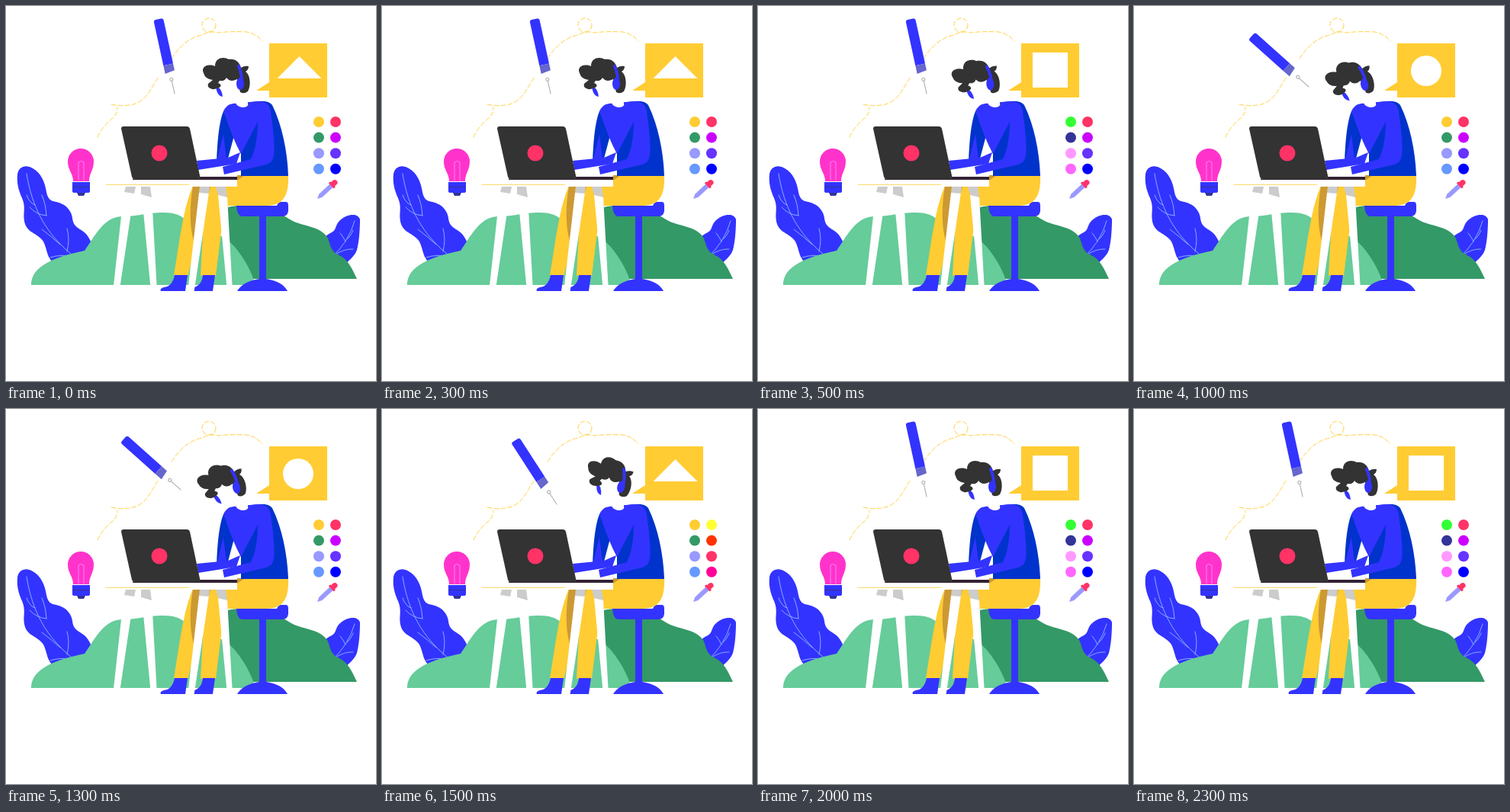
An HTML page that plays this animation: 485 px wide and 492 px high, repeating every 2500 ms.

```html
<!DOCTYPE html>
<html lang="en">
<head>
<meta charset="utf-8">
<title>Designer at work</title>
<style>
html, body { margin: 0; width: 100%; height: 100%; overflow: hidden; background: #fff }
svg { display: block }
.blue { fill: #33f }
.navy { fill: #03c }
.sun { fill: #fc3 }
.shade { fill: #c93 }
.grey { fill: #ccc }
.dark { fill: #333 }
.white { fill: #fff }
.line { fill: none; stroke-linecap: round; stroke-linejoin: round }
</style>
</head>
<body>
<svg width="485" height="492" viewBox="0 0 485 492">
  <!-- leaves -->
  <path class="blue" d="M15 221C16 211 26 207 35 213C46 219 51 231 53 244C55 254 59 256 66 257C80 260 86 270 87 278C88 291 98 292 104 298C110 304 112 313 118 321L60 335C53 327 54 319 49 309C43 299 29 298 25 286C21 272 27 266 21 252C16 241 14 232 15 221Z"/>
  <path class="blue" d="M464 280C461 271 447 273 438 281C431 287 434 293 427 297C419 301 415 305 416 312L424 334L444 341C448 333 456 331 460 320C463 309 464 292 464 280Z"/>
  <path class="line" stroke="#9cf" stroke-width=".8" d="M27 220C34 264 52 300 90 329M27 248Q31 259 38 261M53 275Q52 259 47 248M31 264Q40 274 53 275M47 293Q60 303 71 313M80 322Q84 306 80 292M58 330Q72 325 90 329M457 282Q449 310 426 331M438 298Q443 304 445 309M455 294Q452 302 447 306M432 326Q444 318 455 319"/>

  <!-- hills -->
  <path fill="#396" d="M284 358V266Q300 260 322 263C352 266 362 274 374 281C388 289 410 288 421 303C426 313 424 321 437 327C450 334 454 346 460 358Z"/>
  <path fill="#6c9" d="M33 366C33 345 54 331 103 321C118 300 128 276 154 276C174 276 183 271 207 271C231 271 237 282 246 292C259 306 274 297 285 303C300 312 320 340 327 366Z"/>

  <!-- stool -->
  <path class="blue" d="M302 262H355Q357 257 361 257H367Q370 257 370 262V269Q369 276 363 276H309Q303 275 302 262ZM332 275H341V358Q362 361 369 374H303Q311 361 332 358Z"/>

  <!-- trousers and shoes -->
  <path class="sun" d="M245 236H266L239 353H220C226 321 231 268 245 236Z"/>
  <path class="shade" d="M245 236H270L260 280L246 308Q238 280 245 236Z"/>
  <path class="sun" d="M303 222H370C371 248 364 262 341 262H293Q284 264 284 281L275 354H255L258 297C262 270 264 250 268 237H303Z"/>
  <path class="shade" d="M303 222H313L303 229Z"/>
  <path class="blue" d="M221 353H238L235 374H203Q201 371 207 369Q218 368 221 353ZM258 353H274L271 374H241Q239 372 244 370Q257 367 258 353Z"/>

  <!-- sweater -->
  <path class="navy" d="M292 130L330 125Q345 124 349 130C362 156 369 192 370 223H308V194L299 170L291 200L276 205C277 178 279 153 285 138Z"/>
  <path class="blue" d="M285 139Q288 129 298 128L330 125L331 150L308 194Q298 176 287 143Z"/>
  <path class="blue" d="M285 168L289 200L276 205Z"/>
  <path class="blue" d="M330 125Q344 124 347 138C350 160 353 186 351 196Q350 205 341 208L286 221L284 211L321 201Q330 182 330 151Z"/>
  <path class="blue" d="M250 203L291 199L307 192L302 207L252 215Z"/>
  <path class="white" d="M301 113H317V127Q319 133 309 133Q301 131 301 126Z"/>

  <!-- table and laptop -->
  <path class="white" d="M151 276L155 237H169L147 385H139ZM178 248H191L198 375H190ZM253 245H266L245 385H237ZM278 248L290 250L297 375H290ZM130 229H303V237H130Z"/>
  <path class="grey" d="M157 237H170L168 246L155 244ZM177 237H189L191 251L177 247ZM254 237H267L266 246L253 245ZM275 237H288L290 251L278 248Z"/>
  <path class="line" stroke="#fc3" stroke-width=".8" d="M131 234.3H240"/>
  <path fill="#323" d="M166 226.500L254 224H303V228H166Z"/>
  <path class="dark" d="M154 158H237Q240 158 241 161L255 227H169Q166 227 165 224L151 161Q151 158 154 158Z"/>
  <circle cx="201" cy="193" r="10.5" fill="#f36"/>

  <!-- bulb -->
  <path fill="#f3c" d="M88 230C88 219 81 216 81 204A17 17 0 0 1 115 204C115 216 109 219 109 230Z"/>
  <path class="line" stroke="#f9f" stroke-width=".8" d="M95 229V205Q98.500 202 102 205V229"/>
  <path class="blue" d="M87 231H110V243Q110 245 107 245H90Q87 245 87 243Z"/>
  <path fill="#339" d="M93 245H104L102 249H95ZM87 237H110V238H87Z"/>

  <!-- dropper -->
  <g transform="translate(408 253) rotate(-43)">
    <path fill="#99f" d="M0 0L6-3H26V3H6Z"/>
    <path fill="#f36" d="M25-5H28V-3.500H32Q35-3 35 0T32 3.500H28V5H25Z"/>
  </g>

  <!-- thread -->
  <g class="line" stroke="#fc3" stroke-width=".9" stroke-dasharray="6 3">
    <path d="M120 172Q127 157 140 147Q146 142 146 133M138 129Q151 132 161 130C184 128 189 108 200 93M217 69C228 52 241 41 257 38Q267 32 277 35Q295 33 315 34Q328 36 336 46"/>
    <circle cx="266" cy="25" r="9"/>
  </g>

  <!-- speech bubble -->
  <path class="sun" d="M345 49H421V120H345V111H328L345 100Z"/>
  <path id="icon" class="white"/>

  <g id="head">
    <path class="blue" d="M275 104Q283 108 284 119Q276 118 275 104Z"/>
    <path class="white" d="M280 93H308V112Q305 123 294 122Q281 119 280 93Z"/>
    <path class="dark" d="M259 88C255 80 264 75 274 79C274 67 286 66 292 70C301 69 306 74 308 81Q313 78 318 79Q318 84 314 86C321 91 321 106 317 112Q312 116 307 113L303 96Q294 101 289 94Q287 99 280 98L278 101Q283 103 281 106Q276 110 270 109Q263 107 265 102L271 97Q261 96 259 88Z"/>
    <path class="line" stroke="#33f" stroke-width="4" d="M305 79Q310 90 309 104"/>
    <ellipse class="blue" cx="307" cy="102" rx="5" ry="8"/>
  </g>

  <g id="pen">
    <path class="blue" d="M-39-6.500H-97Q-100-6.500-100-3.500V3.500Q-100 6.500-97 6.500H-39Z"/>
    <path fill="#66c" d="M-39-6.500H-30L-28 6.500H-39Z"/>
    <g class="line" stroke="#bbb" stroke-width="1.300"><circle cx="-19" r="2"/><path d="M-17 0H0"/></g>
  </g>
  <g id="swatches"></g>
</svg>
<script>
const byId = id => document.getElementById(id);
const STEP = 500;

const triangle = "M384.500 66L413.500 95H355.500Z";
const square = "M360 61H406V107H360Z";
const circle = "M363 85a20 20 0 1 0 40 0a20 20 0 1 0 -40 0Z";

const warm = ["#fc3", "#396", "#99f", "#69f"];
const neon = ["#3f3", "#339", "#f9f", "#f6f"];
const cool = ["#f36", "#c0f", "#63f", "#00f"];
const hot = ["#ff3", "#f30", "#f36", "#f09"];

// pen: tip x, tip y, angle
const penUp = [221, 115, 77.7], penFlat = [229, 106, 41.7], penMid = [229, 125, 57.1];

const poses = [
  { tilt: 0, pen: penUp, icon: triangle, colors: [warm, cool] },
  { tilt: -6, pen: penUp, icon: square, colors: [neon, cool] },
  { tilt: -11, pen: penFlat, icon: circle, colors: [warm, cool] },
  { tilt: 14, pen: penMid, icon: triangle, colors: [warm, hot] },
  { tilt: 0, pen: penUp, icon: square, colors: [neon, cool] }
];

byId("swatches").innerHTML = [410, 432].map(x =>
  [0, 1, 2, 3].map(row => `<circle cx="${x}" cy="${152 + row * 20.6}" r="7"/>`).join("")
).join("");
const dots = [...byId("swatches").children];

function show({ tilt, pen: [x, y, angle], icon, colors }) {
  byId("head").setAttribute("transform", `rotate(${tilt} 310 128)`);
  byId("pen").setAttribute("transform", `translate(${x} ${y}) rotate(${angle})`);
  byId("icon").setAttribute("d", icon);
  colors.flat().forEach((color, i) => dots[i].setAttribute("fill", color));
}

function tick() {
  show(poses[Math.floor(performance.now() / STEP) % poses.length]);
  requestAnimationFrame(tick);
}
tick();
</script>
</body>
</html>
```
